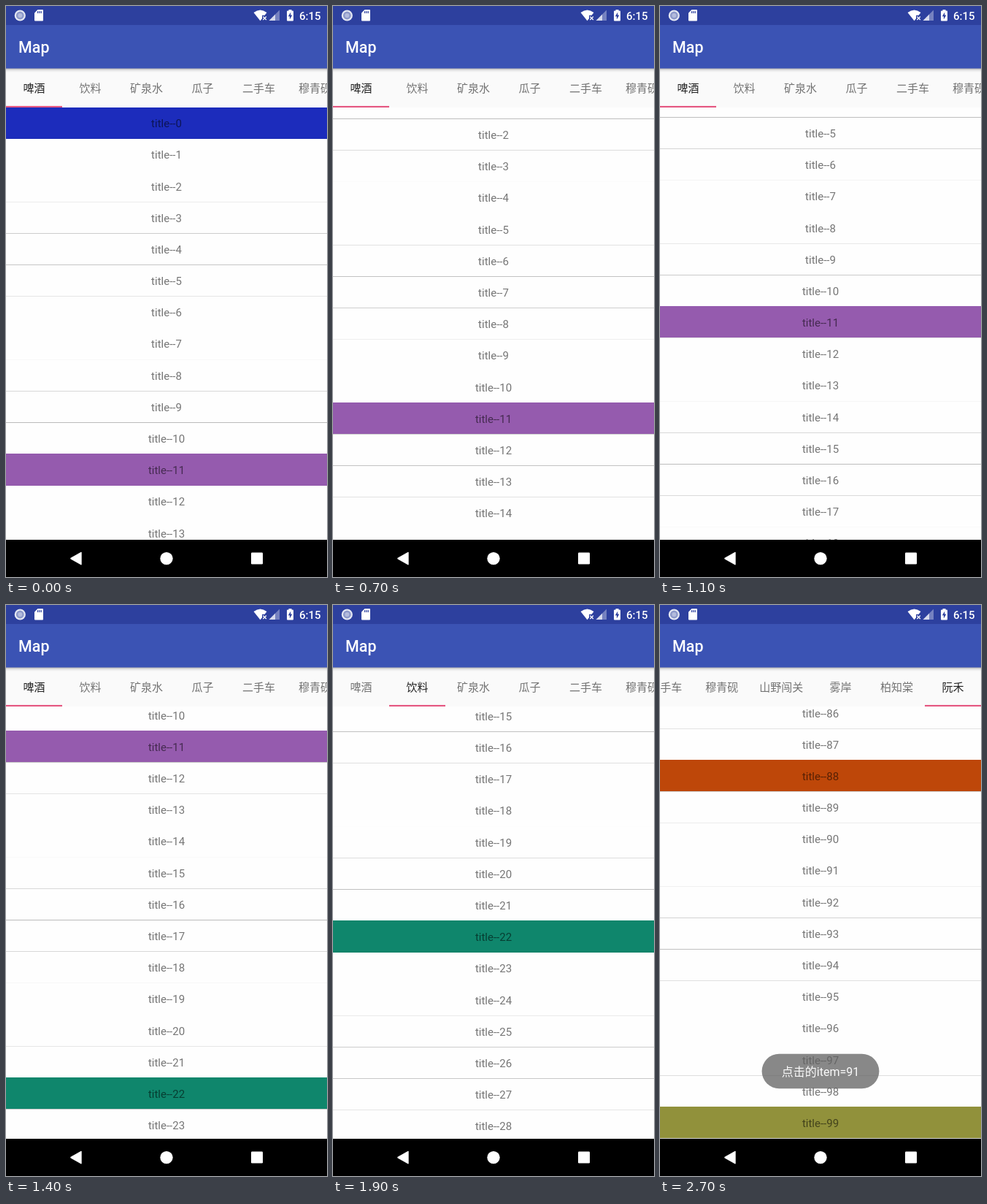
Animation, 440 px wide and 782 px high, one loop 3000 ms. Source, as an HTML page with a canvas:

```html
<!DOCTYPE html>
<html lang="zh-CN">
<head>
<meta charset="utf-8">
<title>Map</title>
<style>
html, body { margin: 0; width: 100%; height: 100%; overflow: hidden; background: #fefefe; }
canvas { display: block; }
</style>
</head>
<body>
<canvas id="stage" width="440" height="782"></canvas>
<script>
const g = document.getElementById('stage').getContext('2d');
const W = 440, LOOP = 3000, LIST_TOP = 138.85, LIST_END = 731, ROW = 43.185, ROWS = 100;
const FONT = "Roboto, 'Noto Sans CJK SC', 'Noto Sans CJK', sans-serif";
const GREY = 'rgba(0,0,0,.54)';

// [time in ms, list scroll in px]
const SCROLL = [[100, 0], [700, 70.5], [1100, 202.1], [1400, 441.3],
                [1700, 552.35], [2200, 948], [2400, 3726.5]];
const MAX_SCROLL = 3726.5;

// every eleventh row opens a section
const SECTION = ['#1c2cbc', '#955bae', '#0f866c', '#00d9a6', '#b4823c',
                 '#4a7fb5', '#a83f62', '#5c9a3a', '#be4709', '#91913b'];
const TABS = ['啤酒', '饮料', '矿泉水', '瓜子', '二手车', '穆青砚', '山野闯关', '雾岸', '柏知棠', '阮禾'];
const tabWidth = name => Math.max(77, name.length * 15 + 25.7);
const TABS_WIDTH = TABS.reduce((sum, name) => sum + tabWidth(name), 0);

function rect(x, y, w, h, color) {
  g.fillStyle = color;
  g.fillRect(x, y, w, h);
}

function roundRect(x, y, w, h, r, color) {
  g.fillStyle = color;
  g.beginPath();
  g.roundRect(x, y, w, h, r);
  g.fill();
}

function text(str, x, y, size, color, align = 'center', weight = 400) {
  g.font = `${weight} ${size}px ${FONT}`;
  g.textAlign = align;
  g.fillStyle = color;
  g.fillText(str, x, y);
}

function shape(path, color) {
  g.fillStyle = color;
  g.fill(new Path2D(path));
}

function disc(x, y, r, color) {
  g.fillStyle = color;
  g.beginPath();
  g.arc(x, y, r, 0, 7);
  g.fill();
}

// average speed of the stretch that ends at key i
function speed(i) {
  if (i < 1 || i >= SCROLL.length) return 0;
  return (SCROLL[i][1] - SCROLL[i - 1][1]) / (SCROLL[i][0] - SCROLL[i - 1][0]);
}

// speed at key i: harmonic mean of its neighbours, so the curve never overshoots
function slope(i) {
  const a = speed(i), b = speed(i + 1);
  return a * b ? 2 * a * b / (a + b) : 0;
}

function scrollAt(t) {
  const i = SCROLL.findIndex(key => t <= key[0]);
  if (i === 0) return 0;
  if (i < 0) return MAX_SCROLL;
  const [t0, s0] = SCROLL[i - 1], [t1, s1] = SCROLL[i];
  const span = t1 - t0, u = (t - t0) / span, v = 1 - u;
  return s0 * v * v * (1 + 2 * u) + s1 * u * u * (1 + 2 * v)
       + span * u * v * (slope(i - 1) * v - slope(i) * u);
}

function drawList(scroll) {
  rect(0, 0, W, LIST_END, '#fefefe');
  const first = Math.floor(scroll / ROW);
  for (let i = first; i < Math.min(ROWS, first + 15); i++) {
    const top = LIST_TOP + i * ROW - scroll, bottom = top + ROW;
    if (i % 11 === 0) {
      const y = Math.floor(top);
      rect(0, y, W, Math.floor(bottom) - y, SECTION[i / 11]);
    }
    // hairline thinner than a pixel: fades as it leaves the pixel centre
    const line = bottom - .2, y = Math.floor(line);
    const ink = Math.max(0, 1 - Math.abs(line - y - .5) / .407);
    rect(0, y, W, 1, `rgba(0,0,0,${.27 * ink})`);
    text('title--' + i, 220, top + 27.3, 15, GREY);
  }
}

function drawTabs(scroll) {
  const active = scroll >= MAX_SCROLL ? TABS.length - 1 : Math.floor(scroll / ROW / 11);
  const before = TABS.slice(0, active).reduce((sum, name) => sum + tabWidth(name), 0);
  const centred = before + tabWidth(TABS[active]) / 2 - W / 2;
  let x = -Math.max(0, Math.min(TABS_WIDTH - W, centred));
  rect(0, 85, W, 54, '#fafafa');
  TABS.forEach((name, i) => {
    const w = tabWidth(name);
    text(name, x + w / 2, 118, 15, i === active ? 'rgba(0,0,0,.87)' : GREY);
    if (i === active) rect(x, 136.9, w, 2.1, '#e4557f');
    x += w;
  });
  const shade = g.createLinearGradient(0, 85, 0, 91);
  shade.addColorStop(0, 'rgba(0,0,0,.32)');
  shade.addColorStop(.5, 'rgba(0,0,0,.08)');
  shade.addColorStop(1, 'rgba(0,0,0,0)');
  rect(0, 85, W, 6, shade);
}

function drawBars() {
  const dark = '#2d409e';
  rect(0, 0, W, 26, dark);
  rect(0, 26, W, 59.5, '#3b53b4');
  text('Map', 17.1, 64, 21.4, '#fff', 'left', 500);

  disc(19.3, 13, 7.6, '#e6e9f3');
  disc(19.3, 13, 5.4, '#8d99c9');
  disc(19.3, 13, 3, '#b3bbdc');
  shape('M43.5 5H50Q51 5 51 6V19.5Q51 20.5 50 20.5H40Q39 20.5 39 19.5V9.5Z', '#fff');
  for (let i = 0; i < 3; i++) rect(43 + i * 2.3, 7, 1.2, 3, dark);

  shape('M339.5 9Q348.5 2 357.5 9L354.5 12.8H351V17.2L348.5 20.3Z', '#fff');
  g.strokeStyle = '#fff';
  g.lineWidth = 1.3;
  g.stroke(new Path2D('M352.3 14.5L356.8 19M356.8 14.5L352.3 19'));
  shape('M360.5 20L375 5.5V20Z', 'rgba(255,255,255,.35)');
  shape('M360.5 20L369 11.5V20Z', 'rgba(255,255,255,.7)');
  shape('M387.5 5H391.5V6.5H393Q394 6.5 394 7.5V19.5Q394 20.5 393 20.5H386Q385 20.5 385 19.5V7.5Q385 6.5 386 6.5H387.5Z', '#fff');
  shape('M390.2 8.5L386.8 14.2H388.9V18.5L392.3 12.6H390.2Z', dark);
  text('6:15', 431.5, 18.5, 15, '#fff', 'right', 500);

  rect(0, LIST_END, W, 51, '#000');
  shape('M88.7 755.8L102.5 748Q103.7 747.4 103.7 748.8V764.4Q103.7 765.8 102.5 765.2L88.7 757.4Q87.6 756.6 88.7 755.8Z', '#fff');
  disc(220, 756.6, 8.7, '#fff');
  roundRect(336, 748.5, 16, 16, 1.3, '#fff');
}

function drawToast() {
  roundRect(139.6, 614.8, 160.8, 47.4, 23.7, 'rgba(97,97,97,.75)');
  text('点击的item=91', 220, 645, 16, '#fafafa');
}

function frame(now) {
  const t = Math.floor(now % LOOP / 100) * 100;
  const scroll = scrollAt(t);
  drawList(scroll);
  drawTabs(scroll);
  drawBars();
  if (t >= 2700) drawToast();
  requestAnimationFrame(frame);
}
frame(0);
</script>
</body>
</html>
```
